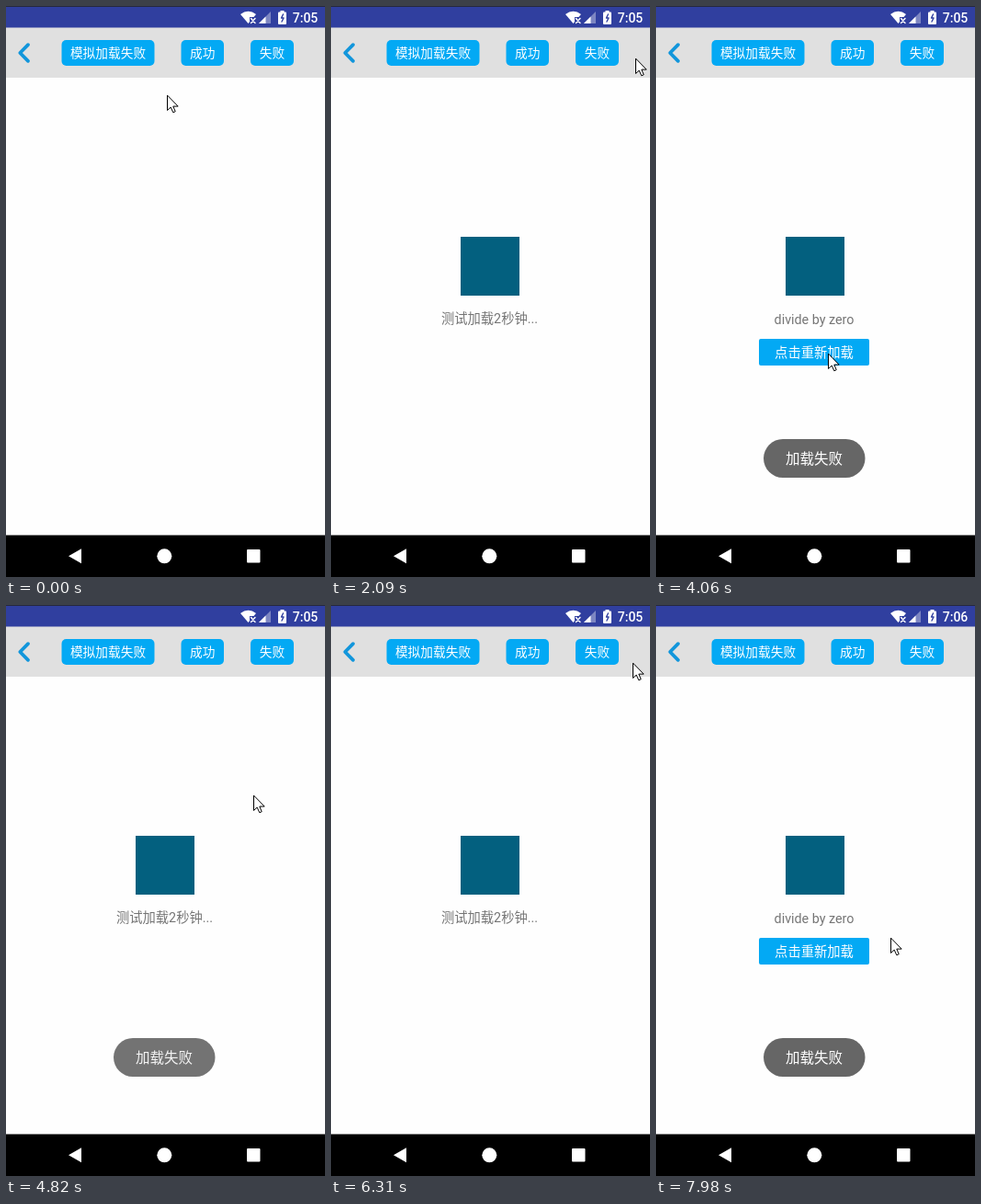
An HTML page with a canvas for the animation above (8000 ms loop, 347 by 621 pixels).

```html
<!DOCTYPE html>
<html lang="zh-CN">
<head>
<meta charset="utf-8">
<title>加载状态</title>
<style>
html, body { margin: 0; width: 100%; height: 100%; overflow: hidden; background: #fefefe; }
canvas { display: block; width: 347px; height: 621px; }
</style>
</head>
<body>
<canvas id="stage"></canvas>
<script>
const W = 347, H = 621, LOOP = 8000;
const LOAD = 2050, TOAST = 2000, PRESS = 90;
const tap = { load: 750, reload: 4490, success: 7490 };
const BAR = '#303f9f', BLUE = '#03a9f4', PRESSED = '#0288d1', GREY = '#757575', WHITE = '#fff';
const FONT = 'Roboto, "Noto Sans CJK SC", "Noto Sans CJK", sans-serif';
const canvas = document.getElementById('stage');
const ctx = canvas.getContext('2d');
const dpr = window.devicePixelRatio || 1;
canvas.width = W * dpr;
canvas.height = H * dpr;

const home = { x: 175, y: 97 };
const moves = [
  { from: 30, to: 500, x: 117, y: 50 },
  { from: 820, to: 1550, x: 307, y: 52 },
  { from: 1580, to: 2090, x: 331, y: 57 },
  { from: 2590, to: 3170, x: 360, y: 240 },
  { from: 3350, to: 4060, x: 187, y: 378 },
  { from: 4650, to: 5310, x: 325, y: 89 },
  { from: 5310, to: 5880, x: 328, y: 63 },
  { from: 6310, to: 6790, x: 269, y: 78 },
  { from: 6790, to: 7090, x: 219, y: 56 },
  { from: 7860, to: 7980, x: 255, y: 362 }
];

const ramp = (t, a, b) => Math.min(1, Math.max(0, (t - a) / (b - a)));
const easeOut = p => 1 - (1 - p) ** 3;
const pressed = (t, at) => t >= at && t < at + PRESS;

function pointerAt(t) {
  let { x, y } = home;
  for (const m of moves) {
    const p = easeOut(ramp(t, m.from, m.to));
    x += (m.x - x) * p;
    y += (m.y - y) * p;
  }
  return [x, y];
}

function rect(x, y, w, h, color) {
  ctx.fillStyle = color;
  ctx.fillRect(x, y, w, h);
}

function round(x, y, w, h, r, color) {
  ctx.fillStyle = color;
  ctx.beginPath();
  ctx.roundRect(x, y, w, h, r);
  ctx.fill();
}

function disc(x, y, r, color) {
  ctx.fillStyle = color;
  ctx.beginPath();
  ctx.arc(x, y, r, 0, Math.PI * 2);
  ctx.fill();
}

function shape(d, color) {
  ctx.fillStyle = color;
  ctx.fill(new Path2D(d));
}

function line(d, width, color) {
  ctx.strokeStyle = color;
  ctx.lineWidth = width;
  ctx.stroke(new Path2D(d));
}

function label(text, x, y, size, color, weight = 400) {
  ctx.font = `${weight} ${size}px ${FONT}`;
  ctx.textAlign = 'center';
  ctx.fillStyle = color;
  ctx.fillText(text, x, y);
}

function button(text, x, y, w, h, r, size, down) {
  round(x, y, w, h, r, down ? PRESSED : BLUE);
  label(text, x + w / 2, y + h / 2 + size * 0.37, size, WHITE);
}

function statusBar(t) {
  rect(0, 0, W, 24, BAR);
  rect(0, 0, W, 1, '#26283c');

  // wifi with a small cross
  shape('M263.5 19 L255 9 Q263.5 2.5 272 9 Z', WHITE);
  rect(265, 12, 8, 8, BAR);
  line('M266.5 13.5 l4.5 5 m0 -5 l-4.5 5', 1.4, WHITE);

  // signal strength
  shape('M288 6 v13 h-13 Z', '#7d86c2');
  shape('M282.5 11.5 v7.5 h-7.5 Z', WHITE);

  // charging battery
  round(296, 6.5, 9, 13.5, 1, WHITE);
  rect(298.5, 5, 4, 2, WHITE);
  line('M301.5 9 l-2 4 h2.5 l-2 4', 1.4, BAR);

  const minute = t < tap.reload + LOAD ? 5 : 6;
  label(`7:0${minute}`, 325.5, 18, 14, WHITE, 500);
}

function header(t) {
  rect(0, 23.5, W, 54.5, '#e0e0e0');
  ctx.lineCap = ctx.lineJoin = 'round';
  line('M24 42.2 L15.3 51 L24 59.8', 3.8, '#1296db');
  const top = (text, x, w, down) => button(text, x, 37, w, 28, 5, 13.7, down);
  top('模拟加载失败', 60.5, 101, pressed(t, tap.load));
  top('成功', 190.5, 46.5, pressed(t, tap.success));
  top('失败', 266, 47, false);
}

function content(t) {
  const begin = t < tap.reload + PRESS ? tap.load : tap.reload;
  ctx.globalAlpha = ramp(t, 910, 1150);
  rect(141, 251, 64, 64, '#03607f');
  if (t < begin + LOAD) {
    label('测试加载2秒钟...', 172.5, 345, 14.3, GREY);
  } else {
    label('divide by zero', 172, 345.5, 14.3, GREY);
    button('点击重新加载', 112, 362, 120, 29, 2, 14.3, pressed(t, tap.reload));
  }
  ctx.globalAlpha = 1;
}

function toast(t, shown) {
  const hidden = shown + TOAST;
  ctx.globalAlpha = ramp(t, shown, shown + 240) * (1 - ramp(t, hidden, hidden + 240));
  round(117, 471, 110.5, 42, 21, '#666');
  label('加载失败', 172, 497.5, 15.5, WHITE);
  ctx.globalAlpha = 1;
}

function navBar() {
  rect(0, 575.5, W, H - 575.5, '#000');
  shape('M68 598.3 l14 -8 v16 Z', WHITE);
  disc(172.3, 598.3, 8, WHITE);
  round(262, 591, 14.5, 14.5, 1, WHITE);
}

function pointer(t) {
  const [x, y] = pointerAt(t);
  const arrow = 'M0 0 v16 l3.7 -3.4 l2.6 5.7 l2.4 -1.1 l-2.4 -5.6 h5 Z';
  ctx.save();
  ctx.translate(Math.round(x) + 0.5, Math.round(y) + 0.5);
  ctx.lineJoin = 'miter';
  shape(arrow, WHITE);
  line(arrow, 1, '#000');
  ctx.restore();
}

function frame(t) {
  ctx.setTransform(dpr, 0, 0, dpr, 0, 0);
  rect(0, 0, W, H, '#fefefe');
  statusBar(t);
  header(t);
  content(t);
  toast(t, tap.load + LOAD);
  toast(t, tap.reload + LOAD);
  navBar();
  pointer(t);
}

const start = performance.now();
function tick() {
  frame((performance.now() - start) % LOOP);
  requestAnimationFrame(tick);
}
tick();
</script>
</body>
</html>
```
